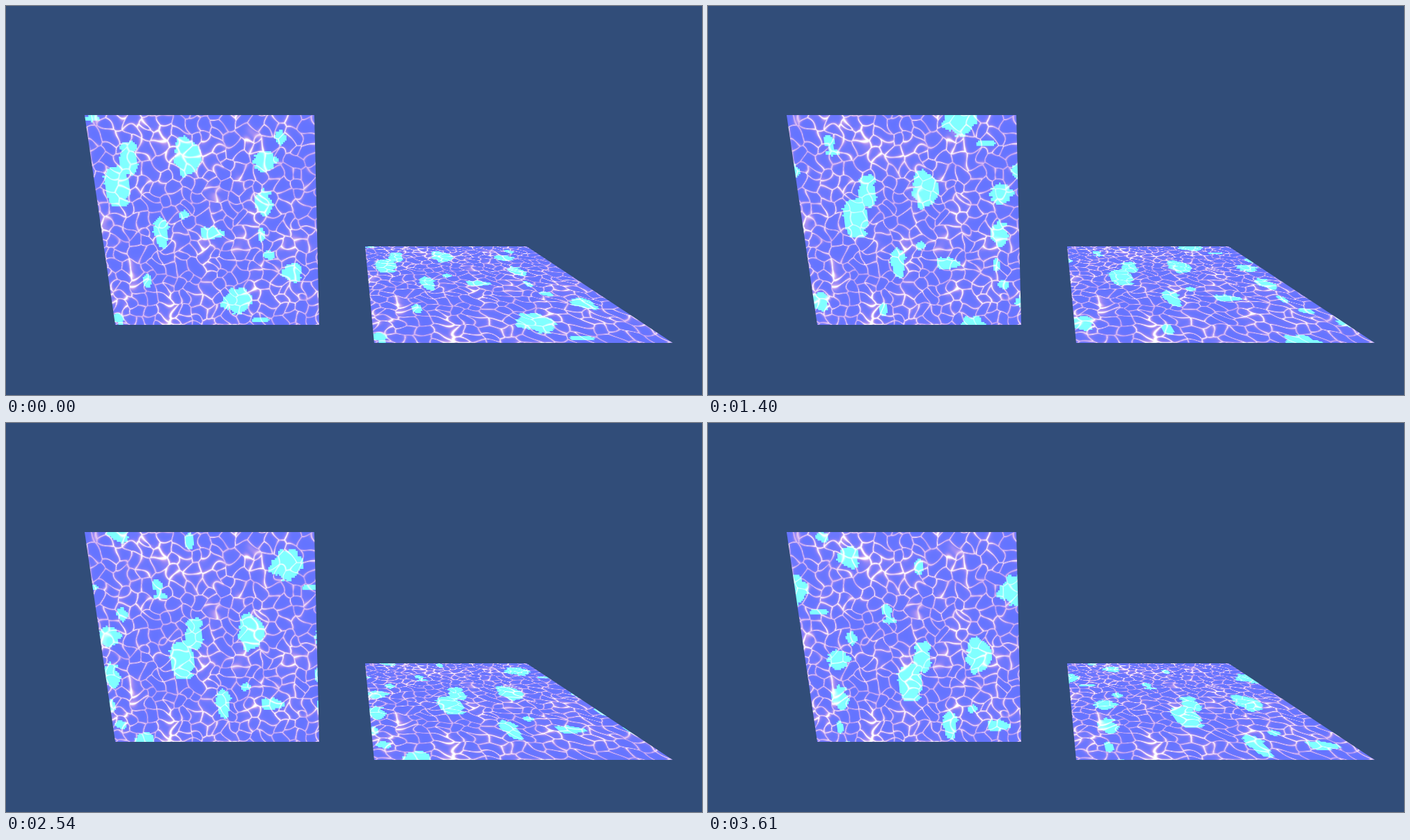
An HTML page with a canvas for the animation above (3640 ms loop, 1000 by 560 pixels).

```html
<!DOCTYPE html>
<html lang="en">
<head>
<meta charset="utf-8">
<title>Scrolling caustics</title>
<style>
  html, body { margin: 0; width: 100%; height: 100%; overflow: hidden; background: #314d79; }
  canvas { position: absolute; left: 0; top: 0; transform-origin: 0 0; }
</style>
</head>
<body>
<script>
const LOOP = 3640, SPEED = 0.1055;  // texture widths per second, both axes
const SIZE = 384, CELLS = 128, GRID = 18;

// Trapezoids: left and right x of the top and bottom edges, then top and bottom y
const WALL = { tl: 113, tr: 443, bl: 157, br: 450, top: 157, bottom: 459 };
const FLOOR = { tl: 516, tr: 748, bl: 529, br: 958, top: 346, bottom: 485 };

// Perspective coefficients: x = (tl + a*u + b*v) / (1 + g*v), y = (top + e*v) / (1 + g*v)
function project(q) {
  const w = (q.tr - q.tl) / (q.br - q.bl);
  return { a: q.tr - q.tl, b: q.bl * w - q.tl, e: q.bottom * w - q.top, g: w - 1 };
}

// Ellipse in stage pixels on the wall -> ellipse in texture space
function toTexture([x, y, rx = 8, ry = 19]) {
  const { a, b, e, g } = project(WALL);
  const v = (y - WALL.top) / (e - g * y), w = 1 + g * v;
  return { u: (x * w - WALL.tl - b * v) / a, v, ru: rx * w / a, rv: ry * w * w / (e - g * WALL.top) };
}

// Main drifting patches; noise roughens their outlines and breaks off crumbs
const patches = [
  [176, 216, 14, 23], [160, 262, 17, 30], [260, 219, 17, 27], [370, 223, 18, 14],
  [394, 189, 7, 12], [371, 283, 12, 20], [367, 328, 5, 9], [378, 358, 8, 6],
  [412, 385, 15, 13], [294, 327, 17, 9], [224, 327, 11, 22], [256, 300, 8, 7],
  [203, 395, 6, 9], [332, 424, 21, 21], [364, 452, 12, 4], [163, 449, 7, 9], [123, 161, 9, 6]
].map(toTexture);

// Bright knots of light
const knots = [[222, 190], [350, 190], [283, 345], [185, 390], [235, 438], [140, 318], [360, 405]].map(toTexture);

function rnd(i, j) {
  const s = Math.sin(i * 127.1 + j * 311.7) * 43758.5453;
  return s - Math.floor(s);
}

const mix = (a, b, f) => a + (b - a) * f;

function noise(x, y) {
  const i = Math.floor(x), j = Math.floor(y);
  const ease = f => f * f * (3 - 2 * f);
  const fx = ease(x - i), fy = ease(y - j);
  return mix(mix(rnd(i, j), rnd(i + 1, j), fx), mix(rnd(i, j + 1), rnd(i + 1, j + 1), fx), fy);
}

// Builds a square image from shade(u, v) -> [r, g, b, a]
function bake(n, shade) {
  const c = document.createElement('canvas');
  c.width = c.height = n;
  const ctx = c.getContext('2d'), img = ctx.createImageData(n, n);
  for (let j = 0; j < n; j++)
    for (let i = 0; i < n; i++)
      img.data.set(shade((i + 0.5) / n, (j + 0.5) / n), (j * n + i) * 4);
  ctx.putImageData(img, 0, 0);
  return c;
}

const mask = bake(CELLS, (u, v) => {
  const wrap = d => d - Math.round(d);
  const limit = 0.3 + noise(u * 30, v * 30) + 0.5 * noise(u * 70 + 9, v * 70);
  const hit = patches.some(p => (wrap(u - p.u) / p.ru) ** 2 + (wrap(v - p.v) / p.rv) ** 2 < limit);
  return hit ? [128, 255, 255, 255] : [0, 0, 0, 0];
});

// Distance to the nearest border of weighted Voronoi cells, whose borders are arcs
function webDistance(x, y) {
  const ci = Math.floor(x), cj = Math.floor(y);
  let near = 9, next = 9;
  for (let j = cj - 2; j <= cj + 2; j++)
    for (let i = ci - 2; i <= ci + 2; i++) {
      const dx = i + 0.1 + 0.8 * rnd(i, j + 50) - x, dy = j + 0.1 + 0.8 * rnd(i + 70, j) - y;
      const d = Math.hypot(dx, dy) / (0.75 + 0.5 * rnd(i + 30, j + 90));
      if (d < near) { next = near; near = d; }
      else if (d < next) next = d;
    }
  return next - near;
}

const water = bake(SIZE, (u, v) => {
  const x = u * GRID + 0.15 * Math.sin(v * 41) + 0.1 * Math.sin(v * 60 + u * 25);
  const y = v * GRID + 0.15 * Math.sin(u * 38) + 0.1 * Math.sin(u * 64 + v * 20);
  const edge = webDistance(x, y);
  let glow = 0.8 * noise(u * 17, v * 7) ** 4;
  for (const p of knots)
    glow += Math.exp(-(((u - p.u) / p.ru) ** 2) - ((v - p.v) / p.rv) ** 2);
  const line = Math.exp(-((edge / (0.085 + 0.1 * glow)) ** 1.4)) * (0.65 + 0.3 * noise(u * 23, v * 23));
  const haze = 0.12 * Math.exp(-edge / 0.2) + 0.4 * glow * Math.exp(-edge / 0.5);
  const c = Math.min(1, line + haze), white = c ** 3;
  return [mix(100, 255, c), mix(116, mix(175, 255, white), c), mix(255, mix(228, 255, white), c), 255];
});

const views = [WALL, FLOOR].map(q => {
  const c = document.createElement('canvas'), { a, b, e, g } = project(q), n = SIZE;
  c.width = c.height = n;
  c.style.transform = `matrix3d(${[a / n, 0, 0, 0, b / n, e / n, 0, g / n, 0, 0, 1, 0, q.tl, q.top, 0, 1]})`;
  document.body.append(c);
  return c.getContext('2d');
});

function paint(ctx, shift) {
  ctx.imageSmoothingEnabled = false;
  ctx.globalCompositeOperation = 'source-over';
  ctx.drawImage(water, 0, 0);
  ctx.globalCompositeOperation = 'lighten';
  for (const dx of [shift, shift - SIZE])
    for (const dy of [shift, shift - SIZE])
      ctx.drawImage(mask, dx, dy, SIZE, SIZE);
}

function frame() {
  const t = performance.now() % LOOP / 1000;
  for (const ctx of views) paint(ctx, t * SPEED * SIZE);
  requestAnimationFrame(frame);
}
frame();
</script>
</body>
</html>
```
